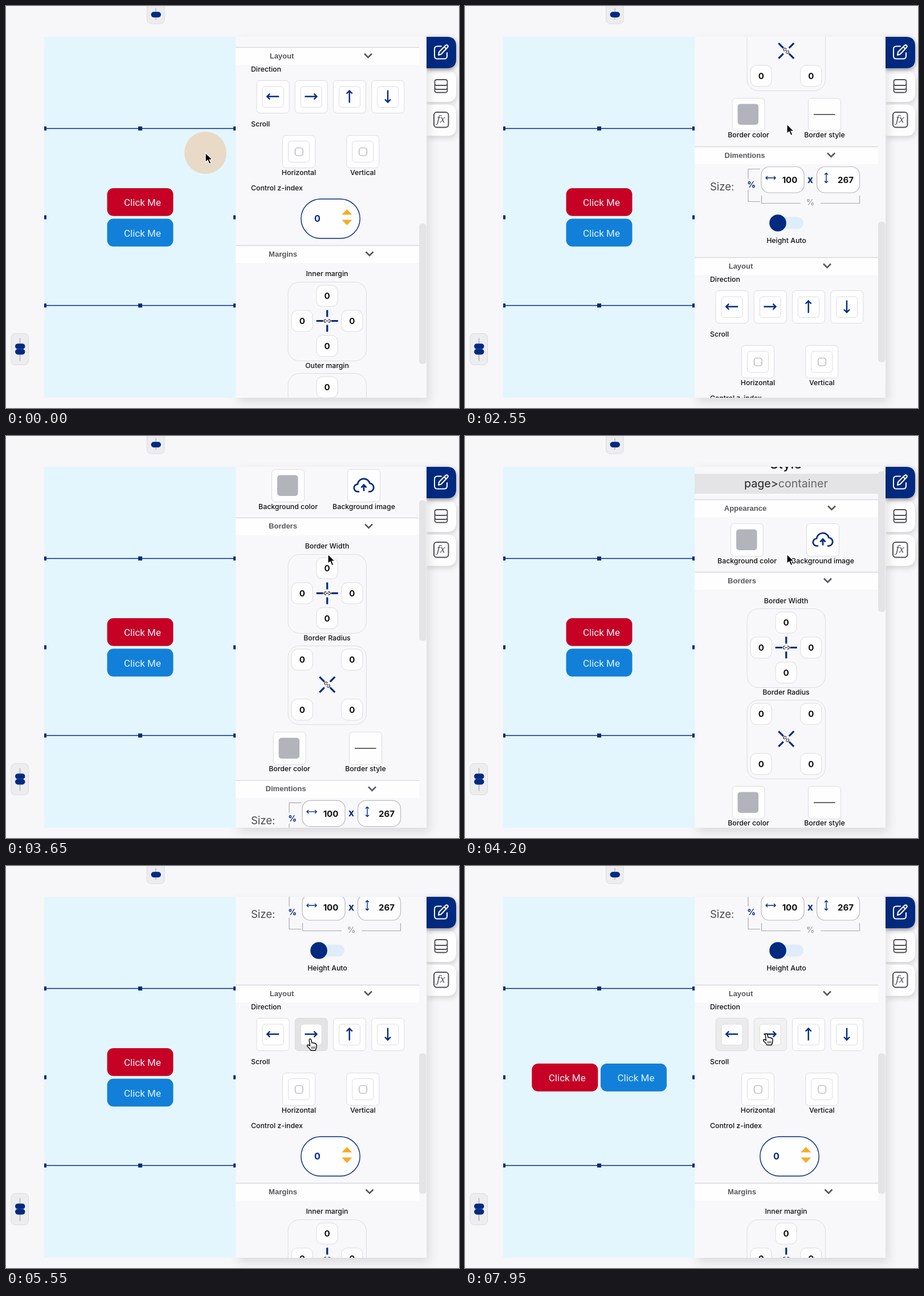
An HTML page that plays this animation: 795x704 px, repeating every 8 s.

```html
<!DOCTYPE html>
<html lang="en">
<head>
<meta charset="utf-8">
<title>Style editor</title>
<style>
  html, body { margin: 0; width: 100%; height: 100%; overflow: hidden; background: #f7f6f9; }
  svg { display: block; font-family: Inter, sans-serif; }
  .label { font-size: 12.3px; fill: #111; font-weight: 450; }
  .head { font: bold 13px "Liberation Sans", sans-serif; fill: #58585c; }
  .num { font-size: 15px; font-weight: 700; fill: #111; }
  .click { font: 17px Roboto, sans-serif; fill: #dcf3fc; }
  .navy { fill: #002a80; }
  .tile { fill: #fefeff; stroke: #dcdce1; }
  .frame { fill: none; stroke: #dcdce1; }
  .line { fill: none; stroke: #002a80; }
  .gray { fill: none; stroke: #a9a9ad; }
  .icon { fill: none; stroke: #505054; stroke-width: 2; stroke-linecap: round; stroke-linejoin: round; }
  .tab { filter: drop-shadow(2px 4px 4px #0002); }
</style>
</head>
<body>
<svg id="stage" width="795" height="704" viewBox="0 0 795 704"></svg>
<script>
const rect = (x, y, w, h, r, attrs) =>
  `<rect x="${x}" y="${y}" width="${w}" height="${h}" rx="${r}" ${attrs}/>`;
const path = (d, attrs) => `<path d="${d}" ${attrs}/>`;
const text = (x, y, str, cls = 'label', attrs = 'text-anchor="middle"') =>
  `<text x="${x}" y="${y}" class="${cls}" ${attrs}>${str}</text>`;
const at = (x, y, body, rotate = 0) =>
  `<g transform="translate(${x} ${y}) rotate(${rotate})">${body}</g>`;
const tile = (x, y, attrs = '') => rect(x + .5, y + .5, 57, 57, 6, `class="tile" ${attrs}`);

const header = (y, title, titleX, chevronX) =>
  rect(403, y, 322, 31, 0, 'fill="#fefeff"') +
  path(`M403 ${y + .5}H725`, 'stroke="#d8d8dd" stroke-width="1.3"') +
  text(titleX, y + 19.5, title, 'head') +
  path(`M${chevronX - 6.5} ${y + 11.5}l6.5 6.5 6.5-6.5`, 'fill="none" stroke="#55555a" stroke-width="2.6"');

const numberBox = (x, y) =>
  rect(x - 18.5, y - 18.5, 37, 37, 10, 'class="tile"') + text(x, y + 5.5, '0', 'num');

const linkIcon =
  path('M0-19V-7M0 7V19M-19 0H-7M7 0H19', 'class="line" stroke-width="3.2"') +
  path('M-1.5-2.5H-3a2.5 2.5 0 0 0 0 5h1.5M1.5-2.5H3a2.5 2.5 0 0 1 0 5H1.5M-2.5 0h5',
    'fill="none" stroke="#222" stroke-width="1.2"');

// Four linked values, on the sides or in the corners
function quad(y, corners) {
  const cx = 563.5, cy = y + 68.5, d = 43.8;
  const spots = corners ? [[-1, -1], [1, -1], [-1, 1], [1, 1]] : [[0, -1], [-1, 0], [1, 0], [0, 1]];
  return rect(495, y + .5, 137.5, 138, 20, 'class="frame"') +
    spots.map(([i, j]) => numberBox(cx + i * d, cy + j * d)).join('') +
    at(cx + .2, cy, linkIcon, corners ? 45 : 0);
}

const swatch = (x, y) => tile(x, y) + rect(x + 10, y + 10.5, 36.5, 36.5, 5, 'fill="#b3b4bb"');

const arrow = path('M-11 0H10M5-5L10 0 5 5', 'class="line" stroke-width="2.4"');
const directionTile = (x, angle, id) =>
  tile(x, 950, `id="${id}"`) + rect(x + 10.5, 961, 37, 36.5, 5, 'class="tile"') + at(x + 28.7, 978.5, arrow, angle);

const scrollTile = (x, label) =>
  tile(x, 1046) + rect(x + 10.5, 1056.5, 37, 37, 5, 'class="tile"') +
  rect(x + 22.5, 1068.5, 13.5, 13.5, 4, 'fill="#fff" stroke="#a8a8ad" stroke-width="1.2"') +
  text(x + 29, 1116, label);

const sizeArrow = path('M-8.5 0H8.5M-5.5-3l-3 3 3 3M5.5-3l3 3-3 3', 'class="line" stroke-width="1.4"');

const panel =
  text(563, 57, 'Style', '', 'text-anchor="middle" font-size="23" font-weight="500" fill="#151515"') +
  rect(403, 66, 322, 35, 0, 'fill="#e4e3e6"') +
  text(563.5, 90, 'page&gt;<tspan fill="#66666a">container</tspan>', '',
    'text-anchor="middle" font-size="19.6" fill="#222"') +
  header(111, 'Appearance', 492, 643.5) +
  swatch(466, 153) + text(495, 223, 'Background color') +
  tile(599, 153) +
  path('M620 192.5h-2.5a6.5 6.5 0 0 1-.5-13a11 11 0 0 1 21.500-1.500a7.300 7.300 0 0 1 .5 14.500h-3M628 191.500V182M623.500 185.500l4.500-5 4.500 5',
    'class="line" stroke-width="2.7"') +
  text(628, 223, 'Background image') +
  header(238, 'Borders', 486, 636.5) +
  text(563.5, 292.5, 'Border Width') + quad(302, false) +
  text(563.5, 453, 'Border Radius') + quad(462, true) +
  swatch(468.5, 613) + text(497.5, 682, 'Border color') +
  tile(602, 613) + path('M612 642H649.5', 'stroke="#333" stroke-width="1.5"') + text(631, 682, 'Border style') +

  header(698, 'Dimentions', 491, 642.5) +
  text(430, 775, 'Size:', '', 'font-size="18.5" fill="#4c4c50"') +
  path('M518 737.5H497V755M497 774V794.500H518M520.500 784V797.500H589M624 797.500H692.500V784', 'class="gray" stroke-width="1.2"') +
  text(502.5, 770, '%', 'navy', 'text-anchor="middle" font-size="14.5" font-weight="700"') +
  text(606, 800.5, '%', '', 'text-anchor="middle" font-size="14.5" font-weight="600" fill="#a0a0a4"') +
  [520, 617.5].map(x => rect(x, 733.5, 75, 45.5, 14, 'fill="#fefeff" stroke="#babac0" stroke-width="1.2"')).join('') +
  at(536.5, 753, sizeArrow) + at(634, 753, sizeArrow, 90) +
  text(570, 762, '100', 'num') + text(668, 762, '267', 'num') +
  text(606, 761.5, 'x', 'navy', 'text-anchor="middle" font-size="17" font-weight="700"') +
  rect(540, 821.5, 54, 21, 10.5, 'fill="#dfedfa"') + '<circle cx="549" cy="832" r="14.8" class="navy"/>' +
  text(564, 866.5, 'Height Auto') +

  header(892, 'Layout', 484, 635.5) +
  text(430, 935, 'Direction', 'label', '') +
  directionTile(439.5, 180, 'leftTile') + directionTile(506.7, 0, 'rightTile') +
  directionTile(574, -90, 'upTile') + directionTile(641.3, 90, 'downTile') +
  text(430, 1031, 'Scroll', 'label', '') + scrollTile(485, 'Horizontal') + scrollTile(597.3, 'Vertical') +
  text(430, 1142.5, 'Control z-index', 'label', '') +
  rect(517.8, 1158, 103.4, 69, 34.5, 'fill="#fefeff" stroke="#002a80" stroke-width="1.4"') +
  text(546.5, 1198, '0', 'navy', 'text-anchor="middle" font-size="16" font-weight="700"') +
  path('M598.3 1176l9 9.500h-18zM598.300 1204l9-9.500h-18z', 'fill="#f8ab22"') +

  header(1239, 'Margins', 486, 638) +
  text(563.5, 1293, 'Inner margin') + quad(1303, false) +
  text(563.5, 1453.5, 'Outer margin') + quad(1463, false);

const handles = [214.5, 524.5].map(y =>
  path(`M68 ${y}H402`, 'class="line" stroke-width="1.4"') + rect(232, y - 3.5, 7, 7, 0, 'class="navy"')).join('') +
  [214.5, 370, 524.5].map(y => [67, 399].map(x => rect(x, y - 3.5, 4, 7, 0, 'class="navy"')).join('')).join('');

const button = (id, color) =>
  `<g id="${id}">${rect(0, 0, 116, 48.7, 11, `fill="${color}"`)}${text(29.5, 31, 'Click Me', 'click', '')}</g>`;

const slider = (x, y, h, pills) =>
  rect(x, y, 30.5, h, 7, 'fill="#ededef" stroke="#dcdcdf"') +
  path(`M${x + 15.5} ${Math.max(y, -4) + 8}V${y + h - 7}`, 'stroke="#a6a6aa" stroke-width="1.2"') +
  pills.map(p => rect(x + 7, p, 17.5, 9.6, 4.8, 'class="navy"')).join('');

const tab = (y, color) =>
  path(`M738 ${y}h36q16 0 16 16v23q0 16-16 16h-36z`, `fill="${color}" class="tab"`);

const tabs = tab(113, '#fefeff') + tab(172.5, '#fefeff') +
  path('M738 54h36q16 0 16 16v23q0 16-16 16h-36z', 'fill="#002a80" style="filter:drop-shadow(0 3px 4px #0006)"') +
  path('M764 70.500h-7q-5 0-5 5v12q0 5 5 5h12q5 0 5-5V82M759 86l1-5.500 11.500-11.500q2-1.500 3.500 0t0 3.500L763.500 84.500zM769 71.500l3.500 3.500',
    'class="icon" style="stroke:#fff"') +
  path('M752.500 132q0-3 4-3h14q4 0 4 3v4q0 3-4 3h-14q-4 0-4-3zM752.500 136.500v6.500q0 3 4 3h14q4 0 4-3v-6.500M752.500 144v4q0 3.500 4 3.500h14q4 0 4-3.500v-4',
    'class="icon" style="stroke-width:1.8"') +
  rect(751, 186, 25.5, 26.5, 5, 'class="icon"') +
  text(763.5, 204, 'fx', '', 'text-anchor="middle" style="font:italic 17px \'Noto Serif\',serif" fill="#505054"');

const arrowCursor = path('M0 0V16.500L4 13 6.800 19.500 9.800 18.200 7 12H12.200Z',
  'fill="#000" stroke="#fff" stroke-width="1.2"');
const handCursor =
  path('M-2 1.500Q-1.500-.5 .5 .2Q1.500 .8 2 3L3 7Q5 5.500 6 7.500Q8 6.500 8.700 8.300Q11 8 11 10.500Q11.500 15 9 20H1Q-1 16.500-4.500 13.500Q-6.500 11-4.500 10.300Q-3 10-.5 12Z',
    'fill="#fff" stroke="#000" stroke-width="1.4" stroke-linejoin="round"') +
  path('M2.500 13.500l.5 4M5 13l.3 4M7.700 13v4', 'fill="none" stroke="#000" stroke-width="1"');

const stage = document.getElementById('stage');
stage.innerHTML =
  `<clipPath id="view">${rect(403, 54, 335, 632, 0, '')}</clipPath>` +
  slider(247.5, -12, 43, [10.3]) + slider(9, 573.5, 55, [591.2, 600.8]) + tabs +
  rect(403, 54, 335, 632, 0, 'fill="#f8f7fa" style="filter:drop-shadow(5px 8px 9px #0000001c)"') +
  rect(67, 54, 336, 632, 0, 'fill="#e4f6fd"') +
  handles + button('red', '#c70025') + button('blue', '#1280d8') +
  `<g clip-path="url(#view)"><g id="content">${panel}</g>` +
  rect(725, 0, 12.5, 246, 5, 'id="thumb" fill="#e4e4e7"') + '</g>' +
  '<circle id="halo" r="37" fill="#ecc9a2"/>' +
  `<g id="arrowCursor">${arrowCursor}</g><g id="handCursor">${handCursor}</g>`;

// Eased interpolation through [time, value] stops
function track(stops, t) {
  const i = stops.findIndex(s => s[0] > t);
  if (i < 0) return stops[stops.length - 1][1];
  if (i === 0) return stops[0][1];
  const [[t0, a], [t1, b]] = [stops[i - 1], stops[i]];
  const u = (t - t0) / (t1 - t0);
  return a + (b - a) * u * u * (3 - 2 * u);
}

const scrollStops = [[2450, 820], [2500, 812], [2550, 452], [3000, 298], [3300, 298], [3800, 40], [4150, 0], [4350, 0], [5050, 684]];
const cursorX = [[600, 350], [1100, 352], [1600, 352], [2350, 565], [5050, 565], [5350, 534], [7150, 534], [7350, 468], [7750, 468], [7950, 529]];
const cursorY = [[600, 257], [1100, 273], [1600, 273], [2350, 207], [5050, 207], [5350, 303], [7150, 303], [7350, 300], [7750, 300], [7950, 293.500]];
const leftHover = [[7250, 0], [7400, 1], [7850, 1], [7950, .7]];
const rightHover = [[5250, 0], [5400, 1], [7250, 1], [7400, 0], [7850, 0], [7950, .5]];
const clicks = [0, 6250, 7500];

const $ = id => document.getElementById(id);
const move = (id, x, y) => $(id).setAttribute('transform', `translate(${x} ${y})`);
const hoverColor = h => `rgb(${[254, 254, 255].map(c => Math.round(c - 27 * h))})`;

function draw(t) {
  move('content', 0, -track(scrollStops, t));
  $('thumb').setAttribute('y', 62 + track(scrollStops, t - 50) * .389);
  $('leftTile').style.fill = hoverColor(track(leftHover, t));
  $('rightTile').style.fill = hoverColor(track(rightHover, t));

  if (t < 6300) {
    move('red', 177.5, 319);
    move('blue', 177.5, 372.5);
  } else {
    const reversed = t < 7550;
    move('red', reversed ? 238 : 117.3, 346);
    move('blue', reversed ? 117.3 : 238, 346);
  }

  const x = track(cursorX, t), y = track(cursorY, t);
  const overTile = t >= 5250;
  for (const id of ['arrowCursor', 'handCursor', 'halo']) move(id, x, y);
  $('arrowCursor').style.display = overTile ? 'none' : '';
  $('handCursor').style.display = overTile ? '' : 'none';

  const sinceClick = t - clicks.filter(c => c <= t).pop();
  $('halo').style.opacity = .6 * track([[100, 1], [350, 0]], sinceClick);
}

const start = performance.now();
function tick() {
  draw((performance.now() - start) % 8000);
  requestAnimationFrame(tick);
}
draw(0);
requestAnimationFrame(tick);
</script>
</body>
</html>
```
